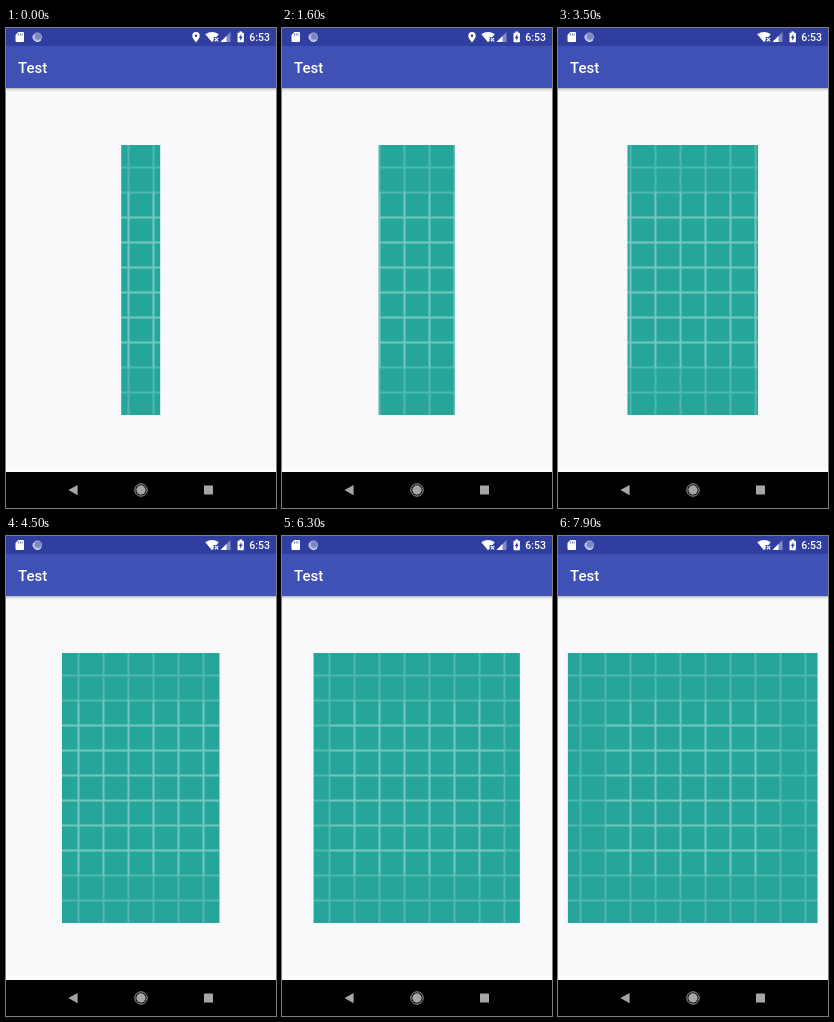
Recreate the animation shown at these times as an HTML page. Size 270 px wide and 480 px high, loop 8000 ms.

```html
<!DOCTYPE html>
<html lang="en">
<head>
<meta charset="utf-8">
<title>Widening grid</title>
<style>
  html, body { margin: 0; width: 100%; height: 100%; overflow: hidden; background: #f9f8fb; }
  svg { display: block; width: 270px; height: 480px; }
  text { font-family: Roboto, sans-serif; font-weight: 500; fill: #fff; }
</style>
</head>
<body>
<svg viewBox="0 0 270 480">
  <defs>
    <linearGradient id="shade" x2="0" y2="1">
      <stop offset="0" stop-color="#000" stop-opacity=".3"/>
      <stop offset=".4" stop-color="#000" stop-opacity=".1"/>
      <stop offset="1" stop-color="#000" stop-opacity="0"/>
    </linearGradient>
    <clipPath id="window"><rect id="slit" y="117" height="270"/></clipPath>
  </defs>

  <rect width="270" height="480" fill="#f9f8fb"/>
  <rect y="440" width="270" height="4" fill="#fdfdfd"/>
  <rect y="60" width="270" height="4" fill="url(#shade)"/>
  <rect y="18" width="270" height="42" fill="#3f51b5"/>
  <rect width="270" height="18" fill="#303f9f"/>
  <text x="12" y="45" font-size="15">Test</text>

  <!-- status bar -->
  <g fill="#fff">
    <path d="M12.3 4H17a1 1 0 0 1 1 1v8a1 1 0 0 1-1 1h-6.5a1 1 0 0 1-1-1V7z"/>
    <path d="M12.5 5.5v2M14.3 5.5v2M16.1 5.5v2" stroke="#303f9f" stroke-width=".7"/>
    <circle cx="31.5" cy="9" r="4.6" fill="#a3abd6"/>
    <circle cx="32.2" cy="8.3" r="3.1" fill="#7c87c2"/>
    <path d="M27.4 7a4.6 4.6 0 0 0 7.4 5.2" fill="none" stroke="#dfe2f2" stroke-width="1"/>
    <path id="pin" fill-rule="evenodd" d="M190 4a3.7 3.7 0 0 0-3.7 3.7C186.3 10.4 190 14.3 190 14.3s3.7-3.9 3.7-6.6A3.7 3.7 0 0 0 190 4zm0 2.4a1.3 1.3 0 1 1 0 2.6a1.3 1.3 0 0 1 0-2.6z"/>
    <path d="M199.3 6.2Q206 1.8 212.8 6.2L210.5 9h-2.8v3.4L206 14.3z"/>
    <path d="M208.8 9.8l3.4 3.6M212.2 9.8l-3.4 3.6" stroke="#fff" stroke-width="1.1"/>
    <path d="M224.5 4v10h-10z" opacity=".4"/>
    <path d="M220.5 8v6h-6z"/>
    <path d="M233.4 3.6h2.6v1.1h1.1a.8.8 0 0 1 .8.8v8a.8.8 0 0 1-.8.8h-4.8a.8.8 0 0 1-.8-.8v-8a.8.8 0 0 1 .8-.8h1.1z"/>
    <path d="M235.3 6.2v2.6h1.4l-2.5 4v-2.9h-1.4z" fill="#303f9f"/>
    <text x="243.3" y="13" font-size="10.5">6:53</text>
  </g>

  <g clip-path="url(#window)">
    <g transform="translate(0 117) scale(2.5)">
      <rect width="108" height="108" fill="#26a69a"/>
      <path id="grid" fill="none" stroke="#fff" stroke-opacity=".2" stroke-width=".8"/>
      <path id="core" fill="none" stroke="#fff" stroke-opacity=".2" stroke-width=".8"/>
    </g>
  </g>

  <!-- navigation bar -->
  <rect y="444" width="270" height="36"/>
  <g fill="#a6a6a6">
    <path d="M71.6 457v10.2L62.4 462.1z"/>
    <circle cx="135" cy="462" r="4.7"/>
    <circle cx="135" cy="462" r="6.2" fill="none" stroke="#a6a6a6" stroke-width="1"/>
    <rect x="198" y="457.5" width="9" height="9" rx=".5"/>
  </g>
</svg>
<script>
const LOOP = 8000, CENTER = 134.7, PIN_OFF = 3100;
const $ = id => document.getElementById(id);

// Lines every 10 units, in both directions, between two ends
function lines(first, last, from, to) {
  let d = "";
  for (let p = first; p <= last; p += 10)
    d += `M${p} ${from}V${to}M${from} ${p}H${to}`;
  return d;
}
$("grid").setAttribute("d", lines(9, 99, 0, 108));
$("core").setAttribute("d", lines(29, 79, 19, 89));

// The picture advances in uneven ticks
function tick(t) {
  if (t < 1200) return Math.floor(t / 100) * 100;
  if (t < 1500) return 1200;
  return 1500 + Math.floor((t - 1500) / 200) * 200;
}

function halfWidth(t) {
  return t < 900 ? 19.5 + 10.5 * t / 900 : 17.8 + 0.01355 * t;
}

function draw(now) {
  const t = now % LOOP, half = halfWidth(tick(t));
  $("slit").setAttribute("x", CENTER - half);
  $("slit").setAttribute("width", half * 2);
  $("pin").style.display = t < PIN_OFF ? "" : "none";
}

const start = performance.now();
function frame() {
  draw(performance.now() - start);
  requestAnimationFrame(frame);
}
frame();
</script>
</body>
</html>
```
